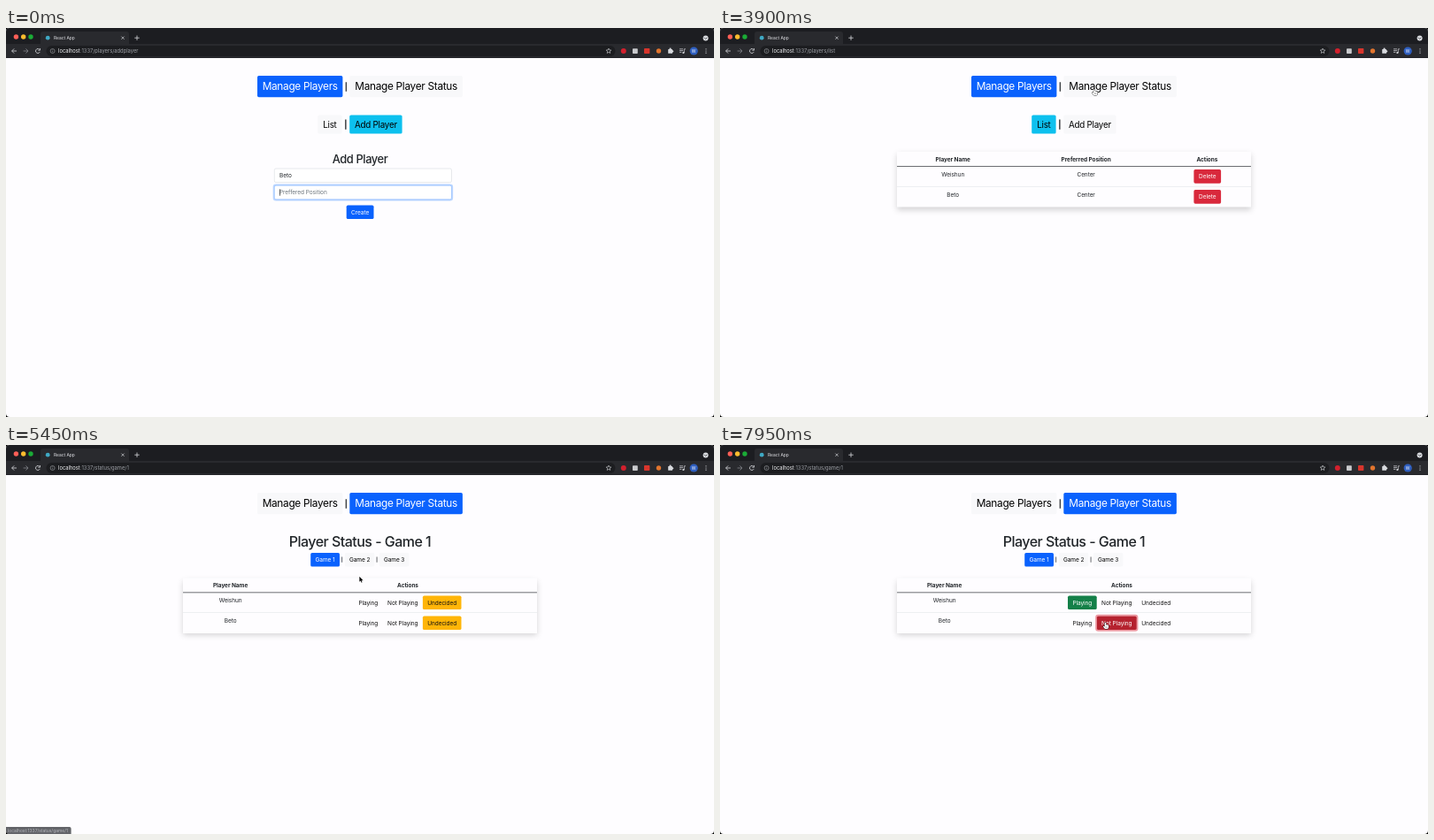
An HTML page with a canvas that plays this animation: 800x440 px, repeating every 8000 ms.

```html
<!DOCTYPE html>
<html lang="en">
<head>
<meta charset="utf-8">
<title>Player manager</title>
<style>
  html, body { margin: 0; width: 100%; height: 100%; overflow: hidden; background: #000; }
  canvas { display: block; width: 800px; height: 440px; }
</style>
</head>
<body>
<canvas id="stage"></canvas>
<script>
const W = 800, H = 440, LOOP = 8000;
const canvas = document.getElementById('stage');
const ctx = canvas.getContext('2d');
const dpr = window.devicePixelRatio || 1;
canvas.width = W * dpr;
canvas.height = H * dpr;

const INK = '#212529', BLUE = '#0a62fd', BLUE_DARK = '#0a51d3', CYAN = '#0dc0ee';
const RED = '#d9293c', RED_DARK = '#b5222f', GREEN = '#148048', GREEN_DARK = '#126c3e';
const AMBER = '#ffb507', LIGHT = '#f8f8fa', PAGE = '#fefdff', ICON = '#d8dade';
const BLUE_RING = 'rgba(13,110,253,.27)', GREEN_RING = 'rgba(25,135,84,.4)', RED_RING = 'rgba(220,53,69,.5)';
const PLAYERS = ['Weishun', 'Beto'];

// Event times in ms
const KEYS = [950, 1090, 1230, 1380, 1560, 1680];
const SAVED = 2200, OPEN_STATUS = 4250, LEAVE_LINK = 4690;
const CLICK_PLAYING = 6000, SET_PLAYING = 6250, CLICK_NOT = 7720, SET_NOT = 7820;

// Pointer stops: time, x, y of the tip
const PATH = [
  [2900, 466, 250], [3350, 446, 160], [3800, 423, 69], [4350, 423, 69],
  [4700, 390.7, 88], [5000, 391, 100], [5200, 395, 126], [5750, 405, 178.5],
  [6750, 405, 178.5], [7450, 435.5, 201], [8000, 435.5, 201]
];

const clamp = v => Math.max(0, Math.min(1, v));
const ramp = (t, a, b) => clamp((t - a) / (b - a));
const ease = u => u * u * (3 - 2 * u);

function mix(a, b, u) {
  const part = (c, i) => parseInt(c.slice(1 + 2 * i, 3 + 2 * i), 16);
  return `rgb(${[0, 1, 2].map(i => Math.round(part(a, i) + (part(b, i) - part(a, i)) * u))})`;
}

function text(str, x, y, size, { color = INK, align = 'center', weight = 400, track = -.01 } = {}) {
  ctx.font = `${weight} ${size}px Inter, "Open Sans", sans-serif`;
  ctx.letterSpacing = `${track * size}px`;
  ctx.textAlign = align;
  ctx.fillStyle = color;
  ctx.fillText(str, x, y);
  return ctx.measureText(str).width;
}

function rect(x, y, w, h, color, r = 0) {
  ctx.fillStyle = color;
  ctx.beginPath();
  ctx.roundRect(x, y, w, h, r);
  ctx.fill();
}

function disc(x, y, r, color) {
  ctx.fillStyle = color;
  ctx.beginPath();
  ctx.arc(x, y, r, 0, 7);
  ctx.fill();
}

// Polyline through flat x,y pairs
function line(pts, color = ICON, width = .8) {
  ctx.strokeStyle = color;
  ctx.lineWidth = width;
  ctx.beginPath();
  for (let i = 0; i < pts.length; i += 2) ctx.lineTo(pts[i], pts[i + 1]);
  ctx.stroke();
}

function ring(x, y, w, h, color) {
  ctx.strokeStyle = color;
  ctx.lineWidth = 1.67;
  ctx.beginPath();
  ctx.roundRect(x - .8, y - .8, w + 1.6, h + 1.6, 2.4);
  ctx.stroke();
}

function button(label, x, y, w, h, size, { fill, color = '#fff', track, focus } = {}) {
  if (fill) rect(x, y, w, h, fill, 1.7);
  if (focus) ring(x, y, w, h, focus);
  text(label, x + w / 2, y + h / 2 + size * .365, size, { color, track });
}

function star(cx, cy, r) {
  ctx.strokeStyle = ICON;
  ctx.lineWidth = .6;
  ctx.beginPath();
  for (let i = 0; i < 10; i++) {
    const a = -Math.PI / 2 + i * Math.PI / 5, q = i % 2 ? r * .45 : r;
    ctx.lineTo(cx + q * Math.cos(a), cy + q * Math.sin(a));
  }
  ctx.closePath();
  ctx.stroke();
}

function drawBrowser(path) {
  rect(0, 0, W, 34, '#1c1d21');
  rect(0, 18, W, 15.5, '#292a2e');
  rect(39, 4, 100, 15, '#292a2e', [3, 3, 0, 0]);
  ['#fe5f57', '#febc2e', '#1aab36'].forEach((c, i) => disc(11.4 + i * 8.3, 10, 2.7, c));
  disc(47.2, 11.2, 2.4, '#3fa9c4');
  text('React App', 54, 13, 4.9, { color: '#e3e4e8', align: 'left', track: 0 });
  line([130.4, 9.6, 133.6, 12.8], ICON, .7);
  line([133.6, 9.6, 130.4, 12.8], ICON, .7);
  line([145.3, 11.2, 150.7, 11.2]);
  line([148, 8.5, 148, 13.9]);
  disc(790.6, 11.4, 3, ICON);
  line([789, 10.8, 790.6, 12.4, 792.2, 10.8], '#1c1d21', .7);

  line([12, 26, 6.6, 26]);
  line([9.2, 23.4, 6.6, 26, 9.2, 28.6]);
  line([19.6, 26, 25, 26], '#85878c');
  line([22.4, 23.4, 25, 26, 22.4, 28.6], '#85878c');
  ctx.strokeStyle = ICON;
  ctx.lineWidth = .8;
  ctx.beginPath();
  ctx.arc(36, 26, 2.5, .4, 5.5);
  ctx.stroke();
  line([38.5, 23, 38.5, 25.2, 36.3, 25.2]);

  rect(45.5, 20, 643, 12, '#1c1d20', 6);
  ctx.strokeStyle = '#a4a6ab';
  ctx.lineWidth = .6;
  ctx.beginPath();
  ctx.arc(52.6, 26, 2.5, 0, 7);
  ctx.stroke();
  line([52.6, 25.6, 52.6, 27.4], '#a4a6ab', .6);
  line([52.6, 24.4, 52.6, 25], '#a4a6ab', .6);
  const w = text('localhost', 59, 28, 5.8, { color: '#f1f2f4', align: 'left', track: 0 });
  text(':1337' + path, 59 + w, 28, 5.8, { color: '#9da0a6', align: 'left', track: 0 });

  star(681, 26, 3);
  disc(697.8, 26, 3, '#d3202d');
  rect(708, 23.2, 5.8, 5.8, '#c9cacd', .8);
  rect(721, 23, 6.4, 6, '#d8352c', .8);
  disc(737.5, 26, 2.7, '#e2752e');
  rect(748.2, 24, 4.8, 4.8, ICON, .6);
  disc(750.6, 23.7, 1.1, ICON);
  disc(753.2, 26.4, 1.1, ICON);
  [23.8, 25.6].forEach(y => line([761, y, 765, y], ICON, .7));
  line([761, 27.4, 763.4, 27.4], ICON, .7);
  line([768, 23.8, 766.3, 23.8, 766.3, 28], ICON, .7);
  disc(765.4, 28, 1.1, ICON);
  disc(777.2, 26, 4.6, '#2f5fc0');
  text('W', 777.2, 27.8, 4.8, { color: '#fff' });
  [23.8, 26, 28.2].forEach(y => disc(791, y, .6, ICON));
}

function drawMainNav(t) {
  const status = t >= OPEN_STATUS, opt = { track: -.024 };
  const hover = 1 - ramp(t, LEAVE_LINK, LEAVE_LINK + 150);
  const onFill = mix(BLUE, BLUE_DARK, hover);
  button('Manage Players', 284, 54, 96.4, 24.3, 11.8,
    { ...opt, fill: status ? LIGHT : BLUE, color: status ? '#000' : '#fff' });
  rect(383.7, 61.3, 1.2, 10.4, INK);
  button('Manage Player Status', 388.3, 54, 127.6, 24.3, 11.8,
    { ...opt, fill: status ? onFill : LIGHT, color: status ? '#fff' : '#000' });
}

function drawPlayerNav(list) {
  const opt = { color: '#000', track: -.024 };
  button('List', 352.2, 98.4, 27.4, 21.2, 9.8, { ...opt, fill: list ? CYAN : LIGHT });
  rect(383.2, 103.5, 1.3, 11.2, INK);
  button('Add Player', 388.2, 98.4, 59.4, 21.2, 9.8, { ...opt, fill: list ? LIGHT : CYAN });
}

function field(y, border) {
  rect(303.3, y, 200.2, 15.6, '#fff', 1.7);
  ctx.strokeStyle = border;
  ctx.lineWidth = .5;
  ctx.stroke();
}

function drawForm(t) {
  text('Add Player', 400, 152.6, 12.9, { weight: 500, track: -.032 });
  field(159, '#ced2d9');
  text(PLAYERS[1], 309, 169.2, 6.5, { align: 'left' });
  field(178.2, '#86b7fe');
  ring(303.3, 178.2, 200.2, 15.6, BLUE_RING);

  const count = KEYS.filter(k => k <= t).length;
  const typed = 'Center'.slice(0, count);
  const last = count ? KEYS[count - 1] : 0;
  text(typed || 'Preffered Position', 309, 188.4, 6.5, { align: 'left', color: typed ? INK : '#6c757d' });
  if ((t - last) % 1000 < 500) {
    rect(309 + ctx.measureText(typed).width, 182.2, .6, 7.6, '#111');
  }
  button('Create', 384.7, 200.5, 30.8, 15.6, 6.5, { fill: BLUE });
}

// Card with header row and two body rows
function drawTable(y, heads) {
  ctx.save();
  ctx.shadowColor = 'rgba(0,0,0,.17)';
  ctx.shadowBlur = 6.7 * dpr;
  ctx.shadowOffsetY = 3.3 * dpr;
  rect(200, y, 400, 62.5, PAGE);
  ctx.restore();
  heads.forEach(([label, x]) => text(label, x, y + 10.6, 6.5, { weight: 700 }));
  rect(200, y + 16.1, 400, .7, '#3b3f43');
  rect(200, y + 39.2, 400, .5, '#dee1e6');
  PLAYERS.forEach((name, i) => text(name, heads[0][1], y + 27.6 + i * 23, 6.5));
}

function drawList() {
  drawTable(140, [['Player Name', 263.2], ['Preferred Position', 413.6], ['Actions', 550.4]]);
  [0, 23].forEach(dy => {
    text('Center', 413.6, 167.6 + dy, 6.5);
    button('Delete', 535.4, 160.1 + dy, 30.7, 15.7, 6.5, { fill: RED });
  });
}

function drawStatus(t) {
  text('Player Status - Game 1', 400, 114.8, 16, { weight: 500, track: -.033 });
  [344.2, 382.8, 421.8].forEach((x, i) => {
    button('Game ' + (i + 1), x, 122, i ? 33.6 : 32.8, 15.6, 6.5,
      { fill: i ? LIGHT : BLUE, color: i ? '#000' : '#fff' });
  });
  [379.4, 418.7].forEach(x => rect(x, 126.4, .7, 6.4, INK));

  drawTable(150.4, [['Player Name', 253.6], ['Actions', 454]]);
  const playing = t >= SET_PLAYING, out = t >= SET_NOT;
  const hot = 1 - ramp(t, 6900, 7050);
  const focused = t >= CLICK_PLAYING && t < CLICK_NOT;
  const rows = [
    { pick: playing ? 0 : 2, fill: mix(GREEN, GREEN_DARK, hot),
      focus: focused ? [0, playing ? GREEN_RING : BLUE_RING] : [] },
    { pick: out ? 1 : 2, fill: RED_DARK,
      focus: t >= CLICK_NOT ? [1, out ? RED_RING : BLUE_RING] : [] }
  ];
  const cells = [['Playing', 393, 32.7], ['Not Playing', 425.8, 45], ['Undecided', 470.9, 43.6]];
  rows.forEach((row, r) => cells.forEach(([label, x, w], i) => {
    const on = row.pick === i;
    button(label, x, 170.5 + r * 23, w, 15.6, 6.5, {
      fill: on && (i === 2 ? AMBER : row.fill),
      color: on && i < 2 ? '#fff' : '#111',
      focus: row.focus[0] === i && row.focus[1]
    });
  }));
}

function drawLinkHint(t) {
  const a = ramp(t, 4000, 4120) * (1 - ramp(t, 5400, 5600));
  if (!a) return;
  ctx.globalAlpha = a;
  rect(0, 432, 73.6, 8, '#303136', [0, 2, 0, 0]);
  text('localhost:1337/status/game/1', 2, 437.8, 4.95, { color: '#d2d4d9', align: 'left', track: 0 });
  ctx.globalAlpha = 1;
}

function shape(pts, fill, edge) {
  ctx.beginPath();
  for (let i = 0; i < pts.length; i += 2) ctx.lineTo(pts[i], pts[i + 1]);
  ctx.closePath();
  ctx.lineJoin = 'round';
  ctx.strokeStyle = edge;
  ctx.lineWidth = .9;
  ctx.stroke();
  ctx.fillStyle = fill;
  ctx.fill();
}

function drawPointer(t) {
  if (t < PATH[0][0]) return;
  const i = PATH.findIndex((p, k) => t >= p[0] && t <= PATH[k + 1][0]);
  const [t0, x0, y0] = PATH[i], [t1, x1, y1] = PATH[i + 1];
  const u = ease(ramp(t, t0, t1));
  const x = x0 + (x1 - x0) * u, y = y0 + (y1 - y0) * u;
  const within = (l, top, r, b) => x > l && x < r && y > top && y < b;
  const hand = within(284, 54, 516, 78.3) ||
    (t < OPEN_STATUS ? within(388, 98.4, 447.6, 119.6)
      : within(344, 122, 455.4, 137.6) || within(393, 170.5, 514.5, 186) || within(393, 193.5, 514.5, 209));
  ctx.save();
  ctx.translate(x, y);
  if (hand) {
    shape([-.6, 0, .4, 0, .7, 2.4, 2.2, 2.6, 3.5, 3.2, 3.6, 5, 2.7, 7, -.6, 7, -2.6, 4.4, -2.2, 3.7, -.8, 4.4],
      '#fff', '#1a1a1a');
    [.4, 1.7].forEach(dx => line([dx, 4.2, dx, 6], '#444', .4));
  } else {
    shape([0, 0, 0, 6, 1.4, 4.8, 2.3, 6.9, 3.2, 6.5, 2.3, 4.5, 4.2, 4.4], '#0a0a0a', '#fff');
  }
  ctx.restore();
}

function render(t) {
  ctx.setTransform(dpr, 0, 0, dpr, 0, 0);
  rect(0, 0, W, H, '#000');
  ctx.save();
  ctx.beginPath();
  ctx.roundRect(0, 0, W, H, 4);
  ctx.clip();
  rect(0, 0, W, H, PAGE);
  const path = t >= OPEN_STATUS ? '/status/game/1' : t >= SAVED ? '/players/list' : '/players/addplayer';
  drawBrowser(path);
  drawMainNav(t);
  if (t >= OPEN_STATUS) {
    drawStatus(t);
  } else {
    drawPlayerNav(t >= SAVED);
    if (t >= SAVED) drawList();
    else drawForm(t);
  }
  drawLinkHint(t);
  drawPointer(t);
  ctx.restore();
}

const start = performance.now();
function tick() {
  render((performance.now() - start) % LOOP);
  requestAnimationFrame(tick);
}
tick();
</script>
</body>
</html>
```
